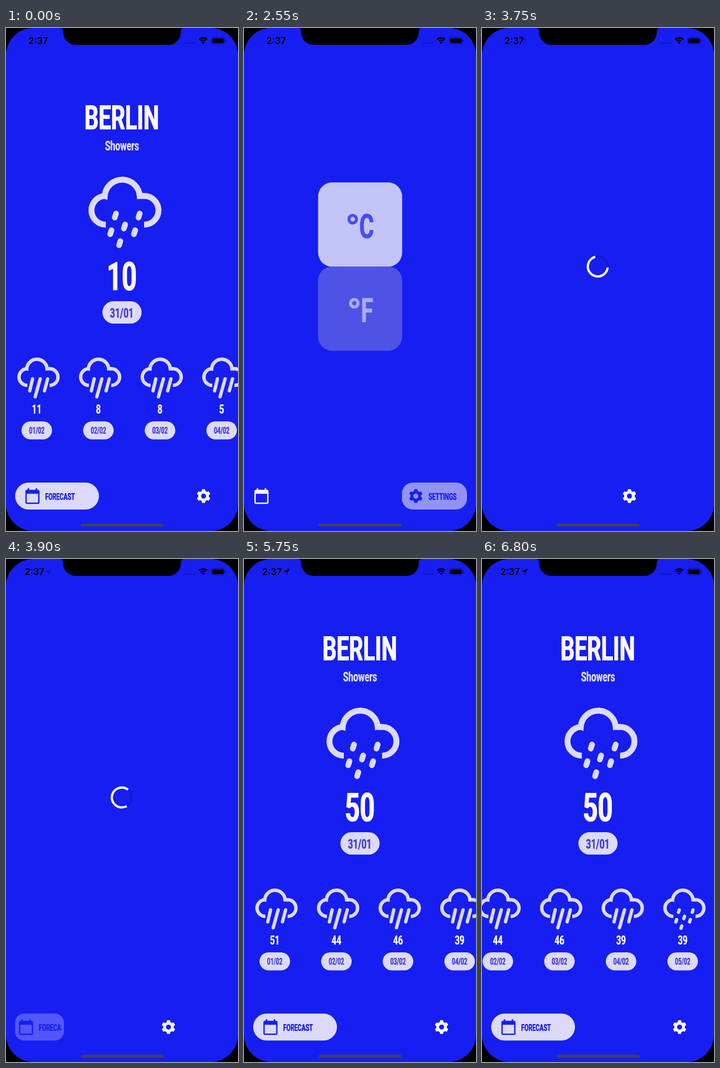
These frames come from a looping animation (509x1101 px, 6.85 s). An HTML page with a canvas:

```html
<!DOCTYPE html>
<html lang="en">
<head>
<meta charset="utf-8">
<title>Weather app</title>
<style>
  html, body { margin: 0; width: 100%; height: 100%; overflow: hidden; background: #000; }
  canvas { display: block; width: 509px; height: 1101px; }
</style>
</head>
<body>
<canvas id="stage"></canvas>
<script>
const W = 509, H = 1101, LOOP = 6850, STEP = 50;
const BLUE = '#171ef2', PALE = '#dcdafb', WHITE = '#fcfaff', DATE = '#463fca';
const CONDENSE = 0.65; // one horizontal scale for the whole display face

const canvas = document.getElementById('stage');
const ctx = canvas.getContext('2d');
const dpr = window.devicePixelRatio || 1;
canvas.width = W * dpr;
canvas.height = H * dpr;

const FORECAST_END = 1450, SETTINGS_END = 3750, LOADING_END = 5050;
const tabProgress = [[1400, 1], [1450, 0], [1650, .5], [2500, .5], [2700, 1],
  [3700, 1], [3750, 0], [3900, .3], [5000, .3], [5050, 1]];
const unitProgress = [[2500, 0], [2700, 1]];
const scrollOffset = [[6100, 0], [6150, 59], [6200, 103], [6250, 132.6],
  [6300, 151], [6350, 162], [6600, 162], [6800, 168]];

const days = [
  { date: '01/02', c: 11, f: 51 },
  { date: '02/02', c: 8, f: 44 },
  { date: '03/02', c: 8, f: 46 },
  { date: '04/02', c: 5, f: 39 },
  { date: '05/02', c: 4, f: 39, showers: true }
];

const lerp = (a, b, k) => a + (b - a) * k;

function track(t, keys) {
  if (t <= keys[0][0]) return keys[0][1];
  for (let i = 1; i < keys.length; i++) {
    const [t0, v0] = keys[i - 1], [t1, v1] = keys[i];
    if (t <= t1) return lerp(v0, v1, (t - t0) / (t1 - t0));
  }
  return keys[keys.length - 1][1];
}

function mix(from, to, k) {
  return `rgb(${from.map((v, i) => Math.round(lerp(v, to[i], k))).join(',')})`;
}

function box(x, y, w, h, r, color) {
  ctx.fillStyle = color;
  ctx.beginPath();
  ctx.roundRect(x, y, w, h, r);
  ctx.fill();
}

function line(x1, y1, x2, y2) {
  ctx.beginPath();
  ctx.moveTo(x1, y1);
  ctx.lineTo(x2, y2);
  ctx.stroke();
}

function ring(x, y, r, width, color, from = 0, to = Math.PI * 2) {
  ctx.strokeStyle = color;
  ctx.lineWidth = width;
  ctx.beginPath();
  ctx.arc(x, y, r, from, to);
  ctx.stroke();
}

function polygon(points) {
  ctx.beginPath();
  points.forEach(([x, y]) => ctx.lineTo(x, y));
  ctx.closePath();
}

// Condensed heading text; the doubled pass keeps the upright stems heavy.
function text(str, x, baseline, size, color, align = 'center') {
  ctx.font = `700 ${size}px Roboto, sans-serif`;
  ctx.textAlign = align;
  ctx.fillStyle = color;
  for (const side of [-1, 1]) {
    ctx.save();
    ctx.translate(x + side * size * .008, baseline);
    ctx.scale(CONDENSE, 1);
    ctx.fillText(str, 0, 0);
    ctx.restore();
  }
}

function weatherIcon(x, y, scale, showers) {
  const { PI } = Math;
  ctx.save();
  ctx.translate(x, y);
  ctx.scale(scale, scale);
  ctx.strokeStyle = PALE;
  ctx.lineWidth = 13;
  ctx.lineCap = 'butt';
  ctx.beginPath();
  ctx.arc(-35.5, 74, 31.5, PI / 2, PI * 1.47);
  ctx.arc(.5, 45.5, 38.5, PI + .07, -.07);
  ctx.arc(48.5, 74, 31.5, -PI / 2, PI / 2);
  ctx.stroke();
  ctx.lineCap = 'round';
  ctx.lineWidth = 12.5;
  if (showers) {
    for (const [dx, dy] of [[-14.5, 85.5], [37.5, 85.5], [5.5, 109.5], [-24.5, 122], [27.5, 122], [-5, 146]]) {
      line(dx + 1.4, dy - 4.4, dx - 1.4, dy + 4.4);
    }
  } else {
    line(-16, 81, -26.5, 126);
    line(13, 81, -6, 148.5);
    line(41, 81, 29, 126);
  }
  ctx.restore();
}

function calendarIcon(x, color) {
  ctx.strokeStyle = ctx.fillStyle = color;
  ctx.lineWidth = 3;
  ctx.beginPath();
  ctx.roundRect(x - 14, 1012.2, 28, 28, 2);
  ctx.stroke();
  ctx.fillRect(x - 14, 1012, 28, 7.5);
  ctx.fillRect(x - 10.5, 1007.5, 3.5, 5);
  ctx.fillRect(x + 7, 1007.5, 3.5, 5);
}

function gearIcon(x, color) {
  const y = 1024.5, points = [];
  for (let i = 0; i < 6; i++) {
    const mid = i * Math.PI / 3 - Math.PI / 2;
    for (const [r, a] of [[11.7, -.36], [15.3, -.21], [15.3, .21], [11.7, .36]]) {
      points.push([x + r * Math.cos(mid + a), y + r * Math.sin(mid + a)]);
    }
  }
  polygon(points);
  ctx.moveTo(x + 5.5, y);
  ctx.arc(x, y, 5.5, 0, Math.PI * 2);
  ctx.fillStyle = color;
  ctx.fill('evenodd');
}

function drawForecast(t) {
  const unit = t >= LOADING_END ? 'f' : 'c';
  text('BERLIN', 254, 222, 74.5, WHITE);
  text('Showers', 254.5, 268, 29.5, PALE);
  weatherIcon(254.5, 325, 1, true);
  text(unit === 'f' ? '50' : '10', 254, 574, 88, WHITE);
  box(211.5, 598, 86, 49, 24.5, PALE);
  text('31/01', 254, 634, 30, DATE);

  const scroll = track(t, scrollOffset);
  days.forEach((day, i) => {
    const x = 67.5 + i * 135.2 - scroll;
    weatherIcon(x, 721, .581, day.showers);
    text(String(day[unit]), x, 844, 28.5, WHITE);
    box(x - 33.5, 861, 67, 39.5, 19.75, PALE);
    text(day.date, x, 887.5, 19.5, DATE);
  });
}

function unitButton(letter, y, ringX, letterX, selected) {
  const ink = mix([220, 218, 251], [23, 30, 242], selected);
  box(162.5, y, 184.5, 184.5, 31, mix([20, 26, 222], [253, 252, 255], selected));
  ring(ringX, y + 80.5, 8.2, 6.6, ink);
  text(letter, letterX, y + 122, 74.5, ink);
}

function drawSettings(t) {
  const k = track(t, unitProgress);
  unitButton('C', 338, 238.5, 269, 1 - k);
  unitButton('F', 522, 242, 270, k);
}

function drawSpinner(t) {
  const turn = (Math.min(t, 3900) - 3900) / 1000 * Math.PI * 2;
  ctx.lineCap = 'butt';
  ring(254, 522, 21.8, 5, '#141ad4');
  ring(254, 522, 21.8, 5, WHITE, turn + 1.05, turn + 5.4);
}

function selectedTab(left, width, k, icon, label) {
  const iconX = left + 18 + 20 * k;
  ctx.globalAlpha = k;
  box(left, 995, width, 59, lerp(15, 29.5, k), PALE);
  ctx.globalAlpha = 1;
  icon(iconX, BLUE);
  ctx.save();
  ctx.beginPath();
  ctx.rect(left, 995, width - 5, 59);
  ctx.clip();
  text(label, iconX + 28, 1033, 20, BLUE, 'left');
  ctx.restore();
}

function drawTabs(t, settings) {
  const k = track(t, tabProgress);
  const open = 74 + 110 * k, closing = 258 - open;
  if (settings) {
    calendarIcon(38.3, WHITE);
    selectedTab(489.2 - open, open, k, gearIcon, 'SETTINGS');
  } else {
    gearIcon(489.5 - closing + 18, WHITE);
    selectedTab(20, open, k, calendarIcon, 'FORECAST');
  }
}

function drawStatusBar(t) {
  const located = t >= LOADING_END;
  const shift = track(t, [[3750, 0], [3900, 8]]) + (located ? 1 : 0);
  ctx.font = '600 20px Inter, sans-serif';
  ctx.textAlign = 'center';
  ctx.fillStyle = '#000';
  ctx.fillText('2:37', 70.5 - shift, 35);

  if (t >= 3800) {
    const s = located ? 1 : .76, x = located ? 87 : 88.5, y = located ? 20.5 : 22.5;
    polygon([[13.5, 0], [0, 6.8], [6.3, 7.3], [6.8, 13.6]].map(([px, py]) => [x + px * s, y + py * s]));
    if (located) {
      ctx.fill();
    } else {
      ctx.strokeStyle = 'rgba(0,0,0,.5)';
      ctx.lineWidth = 1;
      ctx.stroke();
    }
  }

  for (let i = 0; i < 4; i++) box(392.4 + i * 6.2, 30.6, 4.6, 4.6, 2.3, 'rgba(0,0,0,.28)');

  const up = -Math.PI / 2, spread = .73;
  ctx.lineCap = 'butt';
  ring(432.5, 34.8, 13, 3, '#000', up - spread, up + spread);
  ring(432.5, 34.8, 8.4, 2.9, '#000', up - spread, up + spread);
  ctx.beginPath();
  ctx.moveTo(432.5, 35);
  ctx.arc(432.5, 34.8, 5, up - spread, up + spread);
  ctx.fillStyle = '#000';
  ctx.fill();

  ctx.strokeStyle = 'rgba(0,0,0,.5)';
  ctx.lineWidth = 1.1;
  ctx.beginPath();
  ctx.roundRect(450.6, 20.8, 29, 14, 4.2);
  ctx.stroke();
  box(452.5, 22.7, 25.2, 10.2, 2.5, '#000');
  box(480.8, 25.6, 1.7, 4.6, 1, 'rgba(0,0,0,.5)');
}

function drawNotch() {
  ctx.fillStyle = '#000';
  ctx.beginPath();
  ctx.moveTo(118, 0);
  ctx.quadraticCurveTo(125.5, 0, 125.5, 9);
  ctx.arcTo(125.5, 37, 155, 37, 27);
  ctx.arcTo(383.5, 37, 383.5, 9, 27);
  ctx.lineTo(383.5, 9);
  ctx.quadraticCurveTo(383.5, 0, 391, 0);
  ctx.fill();
}

function draw(t) {
  ctx.setTransform(dpr, 0, 0, dpr, 0, 0);
  ctx.fillStyle = '#000';
  ctx.fillRect(0, 0, W, H);
  ctx.save();
  ctx.beginPath();
  ctx.roundRect(0, 0, W, H, 60);
  ctx.clip();
  ctx.fillStyle = BLUE;
  ctx.fillRect(0, 0, W, H);

  const settings = t >= FORECAST_END && t < SETTINGS_END;
  if (settings) drawSettings(t);
  else if (t >= SETTINGS_END && t < LOADING_END) drawSpinner(t);
  else drawForecast(t);

  drawTabs(t, settings);
  drawStatusBar(t);
  drawNotch();
  box(164, 1085, 181.5, 6, 3, '#43424e');
  ctx.restore();
}

const start = performance.now();
function tick() {
  const t = (performance.now() - start) % LOOP;
  draw(Math.floor(t / STEP) * STEP);
  requestAnimationFrame(tick);
}
tick();
</script>
</body>
</html>
```
